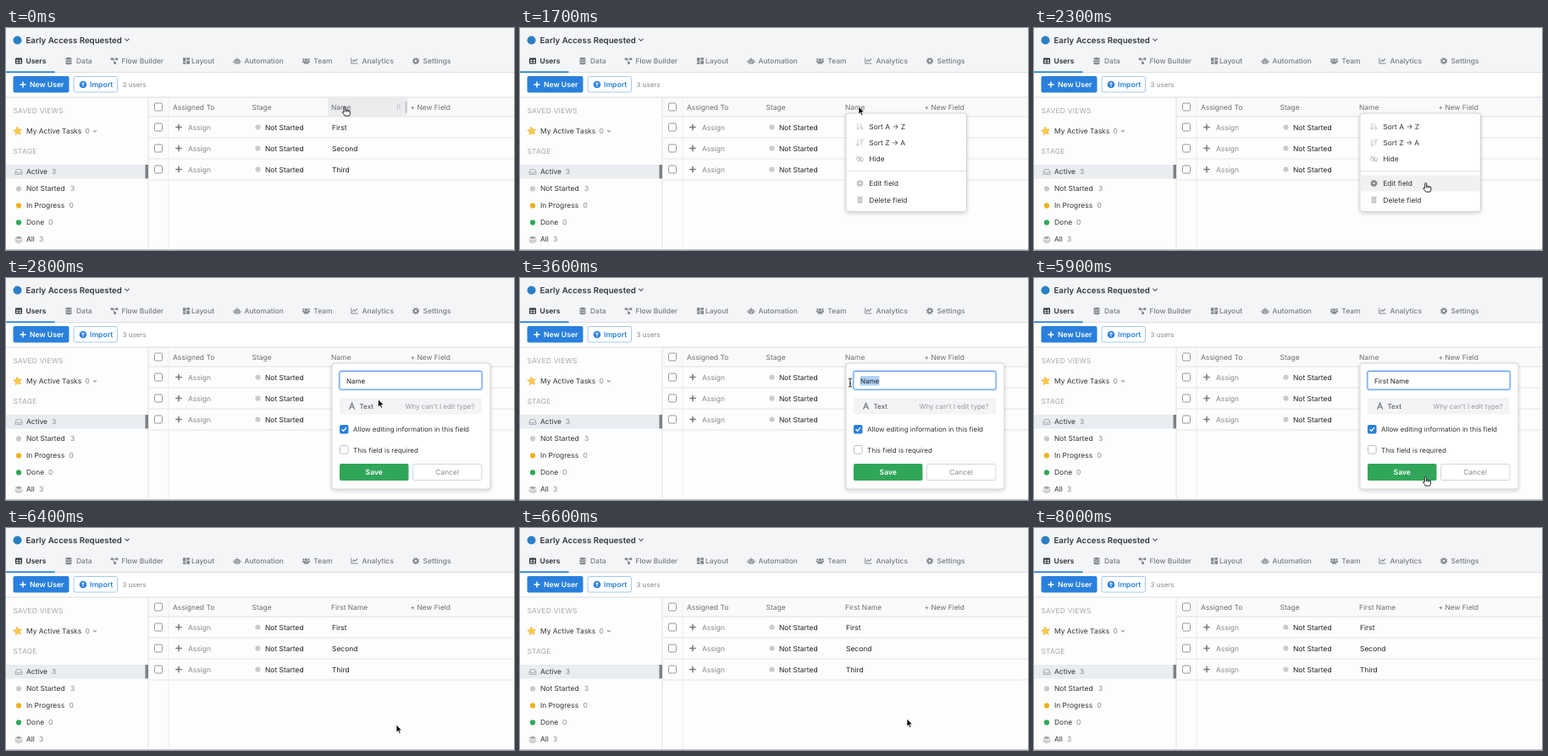
These frames come from a looping animation (600x263 px, 8200 ms). An HTML page:

```html
<!DOCTYPE html>
<html lang="en">
<head>
<meta charset="utf-8">
<title>Rename a field</title>
<style>
  html, body { margin: 0; width: 100%; height: 100%; overflow: hidden; background: #fff; }
  svg { display: block; width: 600px; height: 263px; }
  text {
    font: 400 8.45px Inter, "Open Sans", sans-serif; fill: #30343a;
    white-space: pre; text-rendering: geometricPrecision;
  }
  .title { font-size: 9.7px; font-weight: 600; fill: #33373d; }
  .tab { font-weight: 500; fill: #777b81; }
  .on { font-weight: 600; fill: #2b2f35; }
  .btn { font-size: 8.6px; font-weight: 600; fill: #fff; }
  .blue { fill: #2980dc; }
  .cap { letter-spacing: .2px; fill: #a5a8ad; }
  .mute { fill: #85888d; }
  .head { fill: #6a6d72; }
  .dark { fill: #1f2226; }
  .small { font-size: 8px; }
  .pale { font-size: 8px; fill: #96999e; }
  .type { font-size: 8px; font-weight: 500; fill: #5d6066; }
</style>
</head>
<body>
<svg id="stage" viewBox="0 0 600 263"></svg>
<script>
const LOOP = 8200, STEP = 100, BAR = '#f4f5f7';
const rect = (x, y, w, h, fill, more = '') =>
  `<rect x="${x}" y="${y}" width="${w}" height="${h}" fill="${fill}" ${more}/>`;
const dot = (x, y, r, fill) => `<circle cx="${x}" cy="${y}" r="${r}" fill="${fill}"/>`;
const line = (d, color, w = 1, more = '') =>
  `<path d="${d}" fill="none" stroke="${color}" stroke-width="${w}" ${more}/>`;
const text = (x, cy, str, cls = '', more = '') =>
  `<text x="${x}" y="${cy + (cls === 'title' ? 3.5 : 3.05)}" class="${cls}" ${more}>${str}</text>`;
const at = (x, y, body) => `<g transform="translate(${x} ${y})">${body}</g>`;
const plus = (x, y, r, color, w) =>
  line(`M${x - r} ${y}H${x + r}M${x} ${y - r}V${y + r}`, color, w);
const chevron = (x, y, r, color) => line(`M${x - r} ${y - r / 2}l${r} ${r}l${r} ${-r}`, color, 1.1);
const box = (x, y) => rect(x, y, 9, 9, '#fff', 'rx="1.5" stroke="#8b8e93" stroke-width=".9"');

// Icons are centred on 0,0
const icon = {
  table: c => rect(-4, -3.5, 8, 7, c, 'rx=".8"') +
    [-2.8, .6].map(x => rect(x, -1.4, 2.3, 1.6, BAR) + rect(x, .9, 2.3, 1.5, BAR)).join(''),
  data: c => `<path d="M-3.5-2.7a3.5 1.5 0 0 1 7 0V2.7a3.5 1.5 0 0 1-7 0Z" fill="${c}"/>` +
    [-1.7, 1].map(y => line(`M-3.5 ${y}q3.5 2 7 0`, BAR, .7)).join(''),
  flow: c => line('M-3-2.2H3M-2-2L1 2.4', c, .9) +
    rect(-4.2, -3.7, 2.8, 2.8, c) + rect(1.5, -3.7, 2.8, 2.8, c) + rect(-.8, 1.1, 2.8, 2.8, c),
  layout: c => rect(-4, -3.8, 3.4, 4.4, c) + rect(.3, -3.8, 3.7, 2.6, c) +
    rect(-4, 1.4, 3.4, 2.4, c) + rect(.3, -.3, 3.7, 4.1, c),
  robot: c => rect(-3, -2, 6, 5.4, c, 'rx="1"') + rect(-.5, -3.9, 1, 2, c) +
    rect(-4.6, -.5, 1, 2.7, c) + rect(3.6, -.5, 1, 2.7, c) +
    dot(-1.3, 0, .7, '#fff') + dot(1.3, 0, .7, '#fff') + rect(-1.6, 1.6, 3.2, .7, '#fff'),
  team: c => [-3.1, 3.1].map(x => dot(x, -1.9, 1.1, c) + rect(x - 1.5, -.4, 3, 2.2, c, 'rx="1"')).join('') +
    dot(0, -1.4, 1.7, c) + `<path d="M-2.8 3.4V2.4a2 2 0 0 1 2-1.8H.8a2 2 0 0 1 2 1.8V3.4Z" fill="${c}"/>`,
  chart: c => line('M-3.7-3.5V3H4', c, 1) + line('M-2.3 1L-.5-1.2L1 .2L3.5-2.6', c, 1.1),
  gear: c => `<circle r="2.2" fill="none" stroke="${c}" stroke-width="1.8"/>` +
    `<circle r="3.5" fill="none" stroke="${c}" stroke-width="1.3" stroke-dasharray="1.5 1.25"/>`,
  tray: c => line('M-4 .5L-2.6-2.8H2.6L4 .5V3H-4V.5H-1.6L-.9 1.6H.9L1.6.5H4', c, .9),
  stack: c => `<path d="M-4.4-2L0-4L4.4-2L0 0Z" fill="${c}"/>` +
    line('M-4.4 .1L0 2.1L4.4 .1M-4.4 2.1L0 4.1L4.4 2.1', c, 1),
  sort: (c, down) => line('M-2.5-3.8V3.4M-4 1.8L-2.5 3.6L-1 1.8', c, .9) +
    [0, 1, 2, 3].map(i => rect(.3, -3.6 + i * 2, down ? 4 - i : 1 + i, .9, c)).join(''),
  hide: c => line('M-4.6 0Q0-5 4.6 0Q0 5-4.6 0Z', c, .9) + dot(0, 0, 1.3, c) + line('M-4-3.6L4 3.6', c, 1),
  trash: c => rect(-2.8, -2.5, 5.6, 6.4, c, 'rx=".8"') + rect(-3.4, -3.9, 6.8, .9, c) +
    [-1.4, 0, 1.4].map(x => rect(x - .25, -1.4, .5, 4.1, '#fff')).join(''),
  star: () => {
    const pts = Array.from({ length: 10 }, (_, i) => {
      const r = i % 2 ? 2.5 : 5.2, a = i * Math.PI / 5 - .14;
      return `${(r * Math.sin(a)).toFixed(2)},${(-r * Math.cos(a)).toFixed(2)}`;
    });
    return `<polygon points="${pts.join(' ')}" fill="#fbcb42" stroke="#eda93a" stroke-width=".6" stroke-linejoin="round"/>`;
  }
};

function header() {
  const tabs = [
    ['table', 15, 23.5, 'Users'], ['data', 74, 83, 'Data'], ['flow', 128, 136.5, 'Flow Builder'],
    ['layout', 213, 219, 'Layout'], ['robot', 273, 281.5, 'Automation'], ['team', 354.5, 363.3, 'Team'],
    ['chart', 411.5, 420.5, 'Analytics'], ['gear', 484, 492.5, 'Settings']
  ];
  return rect(0, 0, 600, 52, BAR) + rect(0, 52, 600, 1, '#dcdee1') +
    dot(13.5, 14.5, 5, '#2b7fc4') + text(23.5, 14, 'Early Access Requested', 'title') +
    chevron(143, 14, 2.6, '#4a4e54') +
    tabs.map(([name, ix, tx, label], i) =>
      at(ix, 39, icon[name](i ? '#84878c' : '#2b2f35')) + text(tx, 39, label, i ? 'tab' : 'on')).join('') +
    rect(0, 51.3, 57.5, 1.8, '#2980dc') +
    rect(8.5, 57, 66, 19.5, '#2980dc', 'rx="2"') + plus(20, 67, 3.6, '#fff', 1.5) +
    text(28, 67, 'New User', 'btn') +
    rect(80, 57.5, 51.5, 18.5, '#fff', 'rx="2" stroke="#8dbcec" stroke-width=".8"') +
    dot(91, 67, 4.3, '#2980dc') + line('M91 69.5V64.8M89 66.6L91 64.6L93 66.6', '#fff', 1) +
    text(99, 67, 'Import', 'btn blue') + text(137.5, 67, '3 users', 'small mute');
}

function sidebar() {
  const items = [
    ['Active', 170.4, 54], ['Not Started', 190.4, 76, '#c9cbce'], ['In Progress', 210.4, 74.5, '#eeb11f'],
    ['Done', 230.4, 50, '#2fa858'], ['All', 250.4, 39]
  ];
  const count = { 'In Progress': 0, Done: 0 };
  return rect(0, 82, 168, 181, '#fdfdfd') + rect(0, 162, 168, 16.5, '#e9ecf0') +
    text(8.5, 97.7, 'SAVED VIEWS', 'cap') + text(8.5, 146.2, 'STAGE', 'cap') +
    at(13.7, 122.2, icon.star()) + text(24, 122.2, 'My Active Tasks') +
    text(93.5, 122.2, '0', 'mute') + chevron(105, 122, 1.9, '#96999e') +
    items.map(([label, y, x, color]) =>
      (color ? dot(15, y, 3.1, color) : at(15, y, (label === 'All' ? icon.stack : icon.tray)('#a4a7ab'))) +
      text(24, y, label) + text(x, y, count[label] ?? 3, 'mute')).join('');
}

function table() {
  const rows = ['First', 'Second', 'Third'];
  return rect(168, 82, 432, 181, '#fdfdfd') + rect(168, 82, 432, 23, '#fafafa') +
    rect(0, 81.5, 600, 1, '#dcdee1') +
    rect(167.5, 82, 1, 181, '#dfe1e4') + rect(191.5, 82, 1, 181, '#eceded') +
    [0, 1, 2, 3].map(i => rect(168, 104.5 + i * 25, 432, 1, i ? '#e5e6e8' : '#dfe1e4')).join('') +
    rect(164.5, 162, 3.5, 16.3, '#7d8186') +
    '<g id="glow">' + rect(380, 82, 94, 23, '#ebecee') + rect(471.5, 87, 2.2, 13.5, '#c3c5c9') +
    [0, 1, 2].map(i => rect(462, 90.4 + i * 2.1, 1.1, 1.1, '#aaadb1') + rect(464.4, 90.4 + i * 2.1, 1.1, 1.1, '#aaadb1')).join('') + '</g>' +
    box(175.5, 89) + text(197, 93.5, 'Assigned To', 'head') + text(290.5, 93.5, 'Stage', 'head') +
    text(384, 93.5, 'Name', 'head', 'id="field"') + text(477.5, 93.5, '+ New Field', 'head') +
    rows.map((name, i) => {
      const y = 117.5 + i * 25;
      return box(175.5, y - 4.5) + plus(204, y, 3.7, '#76797e', 1.5) + text(215, y, 'Assign', 'mute') +
        dot(297.5, y, 3.1, '#c9cbce') + text(306, y, 'Not Started', 'dark') + text(385, y, name, 'dark');
    }).join('') + rect(0, 262, 600, 1, '#c4c6c9');
}

const card = (w, h) => rect(385, 101, w, h, '#fff', 'rx="3" stroke="#c9cbcf" stroke-width=".8" filter="url(#shade)"');

function menu() {
  const c = '#b9bbbe';
  const items = [
    [116.5, 'Sort A → Z', icon.sort(c)], [136, 'Sort Z → A', icon.sort(c, true)], [155.2, 'Hide', icon.hide(c)],
    [184, 'Edit field', icon.gear(c)], [203.5, 'Delete field', icon.trash(c)]
  ];
  return '<g id="menu">' + card(142.5, 116.5) + rect(385.5, 169, 141.5, 1, '#e2e3e5') +
    rect(385.5, 174.5, 141.5, 19, '#f1f1f2', 'id="hover"') +
    items.map(([y, label, art]) => at(401.5, y, art) + text(412.3, y, label)).join('') +
    '<g id="gear">' + at(401.5, 184, icon.gear('#808388')) + '</g></g>';
}

function panel() {
  return '<g id="panel">' + card(187, 149) +
    rect(394, 110.5, 168, 21.5, '#fff', 'rx="2" stroke="#c5dcf6" stroke-width="3"') +
    rect(394, 110.5, 168, 21.5, '#fff', 'rx="2" stroke="#559be8" stroke-width="1"') +
    rect(402, 116, 22.5, 11.5, '#b0d2f8', 'id="mark"') + text(402, 121.7, '', 'small dark', 'id="input"') +
    rect(394, 142, 168, 19.5, '#f3f4f5', 'rx="2"') +
    line('M405.5 155.5L408.6 148.3L411.7 155.5M406.8 153H410.5', '#74777c', 1.2) +
    text(417.5, 152, 'Text', 'type') + text(471.5, 152, "Why can't I edit type?", 'pale') +
    rect(394, 174, 10.5, 10.5, '#2980dc', 'rx="2"') + line('M396.6 179.3L398.6 181.3L402 177.2', '#fff', 1.3) +
    text(410, 179.3, 'Allow editing information in this field', 'small') +
    rect(394.5, 198.5, 9.7, 9.7, '#fff', 'rx="2" stroke="#b4b7bb" stroke-width=".9"') +
    text(410, 203.5, 'This field is required', 'small') +
    rect(394, 220, 81.5, 20, '#31a65a', 'rx="2"') + text(434.8, 230.2, 'Save', 'btn', 'text-anchor="middle"') +
    rect(480.5, 220.5, 81.5, 19, '#fff', 'rx="2" stroke="#cfd1d4" stroke-width=".9"') +
    text(521.2, 230.2, 'Cancel', 'mute', 'text-anchor="middle"') + '</g>';
}

const pointers = `<g id="pointer">
  <path id="arrow" d="M0 0V9.2L2.1 7.3L3.5 10.5L5 9.9L3.6 6.7H6.4Z" fill="#000" stroke="#fff" stroke-width=".7"/>
  <path id="hand" d="M-1.1 6V1a1 1 0 0 1 2 0V4q1-.8 1.8.1q1.1-.5 1.7.4q1.7-.2 1.7 1.2V7.4q0 1.4-.9 3.2H-.2q-.5-1.3-1.8-2.8q-1.5-1.7-.5-2.2q.6-.3 1.4.8M.9 4V6M2.7 4.4V6M4.4 4.7V6" fill="#fff" stroke="#111" stroke-width=".9" stroke-linejoin="round"/>
  <path id="beam" d="M-2-5Q0-5 0-4Q0-5 2-5M0-4V4M-2 5Q0 5 0 4Q0 5 2 5M-1 1H1" fill="none" stroke="#222" stroke-width="1"/>
</g>`;

document.getElementById('stage').innerHTML =
  `<defs><filter id="shade" x="-10%" y="-10%" width="120%" height="125%">
    <feDropShadow dx="0" dy="1.5" stdDeviation="2" flood-color="#1c2633" flood-opacity=".2"/></filter></defs>` +
  rect(0, 0, 600, 263, '#fff') + header() + sidebar() + table() + menu() + panel() + pointers;

const $ = id => document.getElementById(id);
const show = (id, on) => $(id).setAttribute('opacity', Number(on));

// time, x, y, pointer kind from then on
const path = [
  [0, 400.3, 93.5, 'hand'], [500, 400.3, 93.5, 'hand'], [600, 400, 93, 'arrow'], [1700, 400, 93, 'arrow'],
  [2000, 448, 162, 'hand'], [2200, 462.8, 183.5, 'hand'], [2500, 462.8, 183.5, 'arrow'], [3000, 427, 122, 'beam'],
  [3100, 427, 122, 'beam'], [3500, 390, 124, 'beam'], [3900, 390, 124, ''], [5300, 390, 124, 'beam'],
  [5400, 396, 134, 'arrow'], [5800, 462.5, 235.5, 'hand'], [6300, 462.5, 235.5, 'arrow'],
  [6600, 457, 226, 'arrow'], [7400, 457, 226, ''], [LOOP, 457, 226, '']
];
const fades = {
  menu: [[0, 0], [600, .4], [700, .85], [800, 1], [2400, 0]],
  panel: [[0, 0], [2400, .5], [2500, 1], [6300, .4], [6400, 0]]
};
const held = (keys, t) => keys.findLast(k => k[0] <= t);

function draw(t) {
  const i = path.findLastIndex(k => k[0] <= t);
  const [t0, x0, y0, kind] = path[i], [t1, x1, y1] = path[i + 1];
  const u = (t - t0) / (t1 - t0), e = u * u * (3 - 2 * u);
  const x = x0 + (x1 - x0) * e, y = y0 + (y1 - y0) * e;
  $('pointer').setAttribute('transform', `translate(${x} ${y})`);
  for (const k of ['arrow', 'hand', 'beam']) show(k, k === kind);

  for (const id in fades) show(id, held(fades[id], t)[1]);
  const over = t >= 2100;
  show('glow', t < 500);
  show('hover', over);
  show('gear', over);

  const left = Math.max(402, Math.min(x, 424.5));
  $('mark').setAttribute('x', left);
  $('mark').setAttribute('width', t >= 3100 && t < 3900 ? 424.5 - left : 0);
  const typed = Math.floor((t - 3900) / STEP) + 1;
  $('input').textContent = typed > 0 ? 'First Name'.slice(0, typed) : 'Name';
  $('field').textContent = t < 6300 ? 'Name' : 'First Name';
}

const start = performance.now();
function tick(now) {
  const t = Math.max(0, now - start) % LOOP;
  draw(Math.floor(t / STEP) * STEP);
  requestAnimationFrame(tick);
}
draw(0);
requestAnimationFrame(tick);
</script>
</body>
</html>
```
